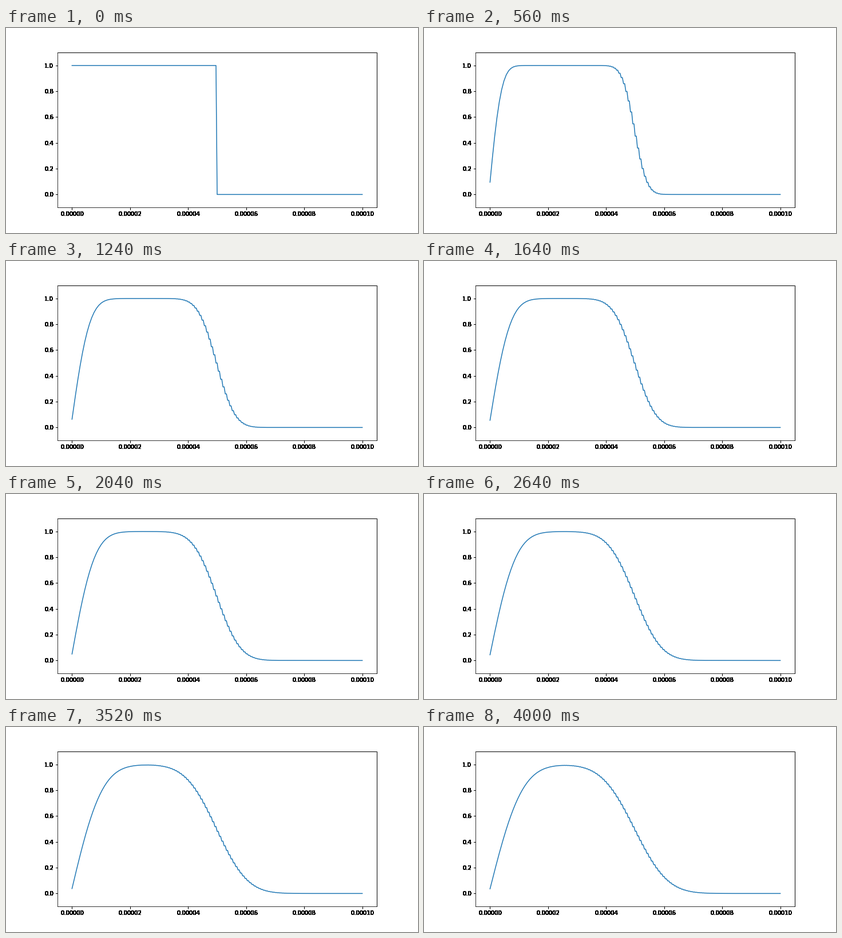
These frames come from a looping animation (720 by 360 pixels, 4040 ms). A matplotlib script:

```python
import numpy as np
import matplotlib.pyplot as plt
from matplotlib.animation import FuncAnimation
from matplotlib.ticker import FormatStrFormatter

LENGTH = 1e-4
NODES = 251
FRAMES = 101
STEPS_PER_FRAME = 5


def diffuse(u):
    """One explicit step at the stability limit, with zeros beyond both ends."""
    p = np.pad(u, 1)
    return 0.5 * (p[:-2] + p[2:])


def solve():
    u = np.where(np.arange(NODES) < NODES // 2, 1.0, 0.0)
    states = [u]
    for _ in range(FRAMES - 1):
        for _ in range(STEPS_PER_FRAME):
            u = diffuse(u)
        states.append(u)
    return states


def solid_black(img, dpi):
    """Turn every touched pixel fully black, giving hard, heavy edges."""
    out = np.zeros_like(img)
    out[..., 3] = img[..., 3] > 0
    return out, 0, 0


plt.rcParams["font.family"] = "DejaVu Sans"
plt.rcParams["font.size"] = 10

fig = plt.figure(figsize=(10, 5), dpi=72, facecolor="white")
ax = fig.add_axes([0.125, 0.125, 0.775, 0.755])
ax.set_xlim(-0.05 * LENGTH, 1.05 * LENGTH)
ax.set_ylim(-0.1, 1.1)
ax.set_xticks(np.linspace(0, LENGTH, 6))
ax.set_yticks(np.linspace(0, 1, 6))
ax.xaxis.set_major_formatter(FormatStrFormatter("%.5f"))
ax.yaxis.set_major_formatter(FormatStrFormatter("%.1f"))
for part in (ax.xaxis, ax.yaxis, ax.spines["top"], ax.spines["right"]):
    part.set_agg_filter(solid_black)

states = solve()
line, = ax.plot(np.linspace(0, LENGTH, NODES), states[0], color="#1f77b4", lw=1.5)


def update(i):
    line.set_ydata(states[i])
    return line,


anim = FuncAnimation(fig, update, frames=FRAMES, interval=40, repeat=True,
                     repeat_delay=0, blit=False)
plt.show()
```
